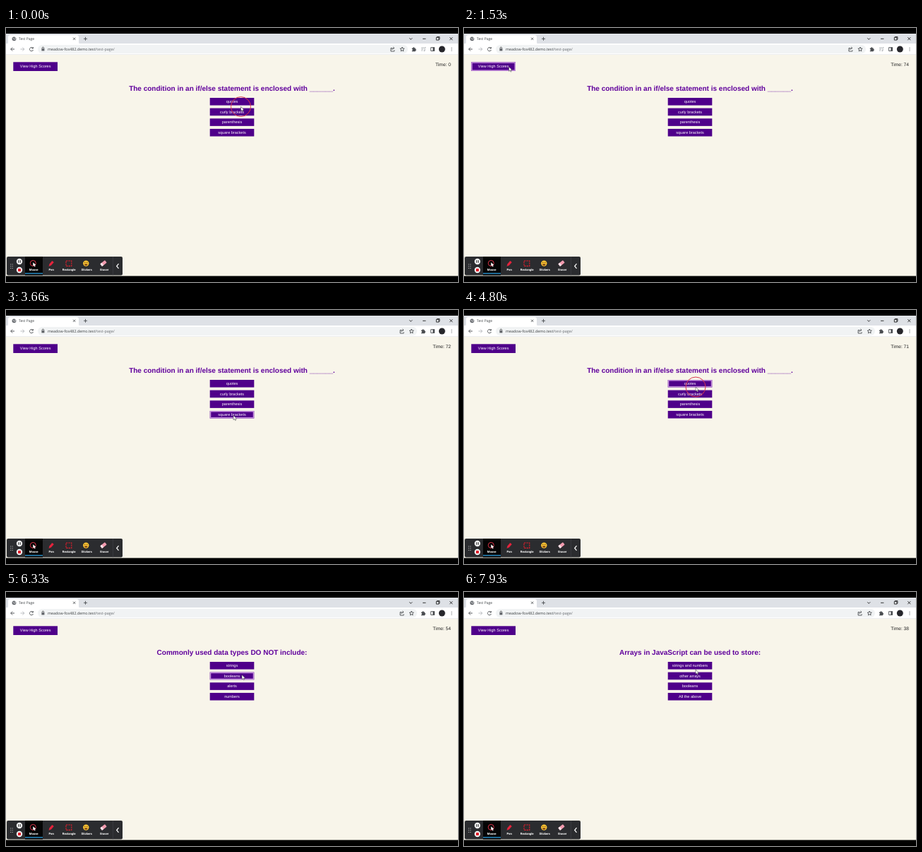
These frames come from a looping animation (640 by 360 pixels, 8000 ms). An HTML page:

```html
<!DOCTYPE html>
<html lang="en">
<head>
<meta charset="utf-8">
<title>Quiz recording</title>
<style>
  html, body { margin: 0; width: 100%; height: 100%; overflow: hidden; background: #000; }
  svg { display: block; width: 100%; height: 100%; }
  text { text-rendering: geometricPrecision; font-family: "Liberation Sans", Arial, sans-serif; }
  .ui { font-family: "Open Sans", sans-serif; fill: #3c4043; }
  .line { fill: none; stroke: #4a4d51; stroke-width: .9; }
  .tool { font: bold 4.2px Roboto, sans-serif; fill: #fff; text-anchor: middle; }
  .label { font-size: 5.55px; fill: #fff; text-anchor: middle; }
  .button rect { fill: #4f008a; }
  .button .ring { fill: none; stroke: #c48fdc; stroke-width: 1.5; visibility: hidden; }
  .button.hover .ring { visibility: visible; }
</style>
</head>
<body>
<svg viewBox="0 0 640 360">
  <rect width="640" height="360"/>

  <!-- Browser frame -->
  <rect y="8" width="640" height="15" fill="#dee1e6"/>
  <path d="M0 23q3 0 3-3v-7q0-3 3-3h94q3 0 3 3v7q0 3 3 3z" fill="#fff"/>
  <rect y="22" width="640" height="16" fill="#fff"/>
  <rect y="37.5" width="640" height=".5" fill="#dadce0"/>
  <circle cx="11.5" cy="15.3" r="2.9" fill="#5f6368"/>
  <path d="M9.5 14.2l2 .8-.6 1.8M12.2 13l1.6 1-1 1.6.4 1.3" fill="none" stroke="#fff" stroke-width=".7"/>
  <text class="ui" x="18" y="17.1" font-size="5">Test Page</text>
  <g class="line">
    <path d="M95 13.7l3.2 3.2m0-3.2L95 16.9M110 15.3h5m-2.5-2.5v5"/>
    <path d="M571.2 14.3l2 2 2-2M590 15.3h4.4M609.3 13.3h3.6v3.8h-3.6zM610.4 13.3v-.8h3.5v3.7h-1M628.3 13.2l4 4m0-4l-4 4" stroke="#222"/>
    <path d="M12 30H6.7m2.5-2.5L6.7 30l2.5 2.5"/>
    <path d="M20.5 30h5.3m-2.5-2.5l2.5 2.5-2.5 2.5" stroke="#b5b8bc"/>
    <path d="M38 28.4A2.6 2.6 0 1 0 38.5 31M38.4 27v2h-2"/>
  </g>
  <rect id="addressBar" x="45" y="24" height="12" rx="6" fill="#f1f3f4"/>
  <path d="M50.4 29.2h4v3.2h-4z" fill="#5f6368"/>
  <path d="M51.2 29.3v-1a1.2 1.2 0 0 1 2.4 0v1" class="line" stroke-width=".7"/>
  <text class="ui" x="59" y="32" font-size="5.4">meadow-fox482.demo.test<tspan fill="#696d72">/test-page/</tspan></text>
  <g id="pageIcons">
    <path class="line" d="M547 28.5h-2.1v4.5h5v-1.7M546.3 31q.3-2.6 3.4-2.6m-1.4-1.4l1.5 1.4-1.5 1.4" stroke-width=".7"/>
    <path class="line" d="M561 27l.9 2 2.2.2-1.7 1.5.5 2.2-1.9-1.2-1.9 1.2.5-2.2-1.7-1.5 2.2-.2z" stroke-width=".7"/>
    <path d="M574.8 28.4h1.4a1.1 1.1 0 0 1 2.2 0h1.4v1.5a1.1 1.1 0 0 1 0 2.2v1.2h-5v-1.3a1 1 0 0 0 0-2z" fill="#4a4d51"/>
  </g>
  <g id="mediaIcon" class="line" style="stroke:#a9adb2">
    <path d="M588 28h4m-4 2h3m-3 2h2M593 32v-4.5h1.4"/><circle cx="592.3" cy="32.2" r=".6"/>
  </g>
  <path class="line" d="M601.6 27.6h5v4.9h-5z"/>
  <path d="M604.3 27.5h2.4v5h-2.4z" fill="#4a4d51"/>
  <circle cx="617.3" cy="30" r="4.5" fill="#26262b"/>
  <g fill="#4a4d51"><circle cx="631" cy="28" r=".6"/><circle cx="631" cy="30" r=".6"/><circle cx="631" cy="32" r=".6"/></g>

  <!-- Quiz page -->
  <rect y="38" width="640" height="313.5" fill="#f8f5ea"/>
  <text id="timer" x="630" y="54" font-size="6.67" text-anchor="end" fill="#222"></text>
  <text id="question" x="320" y="88.7" font-size="10" font-weight="bold" text-anchor="middle" fill="#60009c"></text>
  <g id="buttons"></g>

  <!-- Recorder toolbar -->
  <rect x="1" y="324" width="164" height="26.5" rx="2" fill="#2b2c2f"/>
  <path d="M27 324h25v26.5H27z" fill="#050505"/>
  <path d="M27 347.2h25v1.3H27z" fill="#2b9fe0"/>
  <path d="M151.4 324v26.5" stroke="#45474a" stroke-width=".6"/>
  <path d="M6.7 334.5v7m2.5-7v7" stroke="#bbb" stroke-width="1.1" stroke-dasharray="1.1 1.6"/>
  <circle cx="19" cy="331" r="4.2" fill="#f2f2f2"/>
  <path d="M17.8 329.2v3.6m2.4-3.6v3.6" stroke="#222" stroke-width="1"/>
  <circle cx="19" cy="343" r="4.2" fill="#f2f2f2"/>
  <rect x="17" y="341" width="4" height="4" rx=".5" fill="#e0202c"/>
  <circle cx="38.3" cy="333.4" r="4" fill="none" stroke="#e0354a"/>
  <path d="M38.3 332.3v5.3l1.3-1.1 1 1.9 1-.5-.9-1.9h1.7z" fill="#fff"/>
  <path d="M60.5 337.8l1-3.2 3.8-4.6 2.5 2.1-3.9 4.5z" fill="#e5233c"/>
  <rect x="85" y="330" width="7.8" height="7.4" fill="none" stroke="#e01f2d" stroke-width="1.1" stroke-dasharray="2.4 1"/>
  <circle cx="113.3" cy="333.6" r="4.2" fill="#f8c232"/>
  <path d="M110.9 334.4h4.8q-.4 2.3-2.4 2.3t-2.4-2.3z" fill="#743918"/>
  <path d="M111.2 332.4h1.2m1.8 0h1.2" stroke="#4a2c14" stroke-width="1"/>
  <g transform="rotate(-38 138 333.5)">
    <rect x="133.7" y="331.3" width="8.6" height="4.4" rx=".8" fill="#f29aae"/>
    <rect x="133.7" y="331.3" width="3" height="4.4" rx=".8" fill="#f5e4e8"/>
  </g>
  <g id="tools"></g>
  <path d="M159.5 334.2l-2.8 3.3 2.8 3.3" fill="none" stroke="#fff" stroke-width="1.2"/>

  <circle id="clickRing" r="14" fill="none" stroke="#d93a4c" stroke-width="1"/>
  <path id="cursor" d="M0 0v6.2l1.5-1.3 1.1 2.3 1-.5-1-2.2h2z" fill="#fff" stroke="#333" stroke-width=".5"/>
</svg>

<script>
const DURATION = 8000;
const TIMER_START = 1150, PENALTY = 15;
const ICON_SHIFT_TIME = 2000;
const HOVER_LAG = 70, RING_TIME = 300;
const RING_STARTS = [0, 4650, 6650];

const QUIZ = [
  { from: 0, question: "The condition in an if/else statement is enclosed with ______.",
    answers: ["quotes", "curly brackets", "parenthesis", "square brackets"] },
  { from: 4870, question: "Commonly used data types DO NOT include:",
    answers: ["strings", "booleans", "alerts", "numbers"] },
  { from: 6800, question: "Arrays in JavaScript can be used to store:",
    answers: ["strings and numbers", "other arrays", "booleans", "All the above"] },
];

// Cursor stops: arrival, departure, x, y
const STOPS = [
  [0, 350, 332.5, 111.5],
  [1300, 1750, 63.5, 55],
  [2700, 2950, 325, 125.5],
  [3500, 3850, 322, 149.5],
  [4500, 5150, 328, 109],
  [6100, 7780, 334, 117.5],
  [7900, 8000, 328, 110],
];

const $ = id => document.getElementById(id);

function addElement(parent, tag, attributes, content = "") {
  const node = document.createElementNS("http://www.w3.org/2000/svg", tag);
  for (const name in attributes) node.setAttribute(name, attributes[name]);
  node.textContent = content;
  return parent.appendChild(node);
}

function addButton(x, y, width, height, text = "") {
  const node = addElement($("buttons"), "g", { class: "button" });
  addElement(node, "rect", { x, y, width, height });
  addElement(node, "rect", { class: "ring", x: x + .8, y: y + .8, width: width - 1.6, height: height - 1.6 });
  const label = addElement(node, "text", { class: "label", x: x + width / 2, y: y + height / 2 + 1.8 }, text);
  const contains = (px, py) => px >= x && px <= x + width && py >= y && py <= y + height;
  return { node, label, contains };
}

const scoresButton = addButton(10.3, 48.3, 62.7, 12.7, "View High Scores");
const answerButtons = [0, 1, 2, 3].map(i => addButton(288.7, 99 + i * 14.65, 62.6, 10.6));
["Mouse", "Pen", "Rectangle", "Stickers", "Eraser"].forEach((name, i) =>
  addElement($("tools"), "text", { class: "tool", x: 39.2 + i * 25, y: 344.2 }, name));

function cursorAt(time) {
  const next = STOPS.findIndex(([arrival]) => arrival > time);
  const [, leave, x, y] = STOPS.at(next < 0 ? -1 : next - 1);
  if (next < 0 || time <= leave) return [x, y];
  const [arrive, , toX, toY] = STOPS[next];
  const p = (time - leave) / (arrive - leave);
  const eased = p * p * (3 - 2 * p);
  return [x + (toX - x) * eased, y + (toY - y) * eased];
}

function draw(time) {
  const step = QUIZ.findLastIndex(item => time >= item.from);
  const { question, answers } = QUIZ[step];
  $("question").textContent = question;
  answerButtons.forEach((button, i) => button.label.textContent = answers[i]);

  const seconds = 74 - Math.floor((time - TIMER_START) / 1000) - PENALTY * step;
  $("timer").textContent = "Time: " + (time < TIMER_START ? 0 : seconds);

  const shifted = time >= ICON_SHIFT_TIME;
  $("addressBar").setAttribute("width", shifted ? 537 : 524);
  $("pageIcons").setAttribute("transform", `translate(${shifted ? 13.2 : 0})`);
  $("mediaIcon").setAttribute("visibility", shifted ? "hidden" : "visible");

  const hoverPoint = cursorAt(Math.max(0, time - HOVER_LAG));
  for (const button of [scoresButton, ...answerButtons])
    button.node.classList.toggle("hover", button.contains(...hoverPoint));

  const place = `translate(${cursorAt(time)})`;
  const clicking = RING_STARTS.some(start => time >= start && time < start + RING_TIME);
  $("cursor").setAttribute("transform", place);
  $("clickRing").setAttribute("transform", place);
  $("clickRing").setAttribute("visibility", clicking ? "visible" : "hidden");
}

const startTime = performance.now();
function tick() {
  draw((performance.now() - startTime) % DURATION);
  requestAnimationFrame(tick);
}
tick();
</script>
</body>
</html>
```
